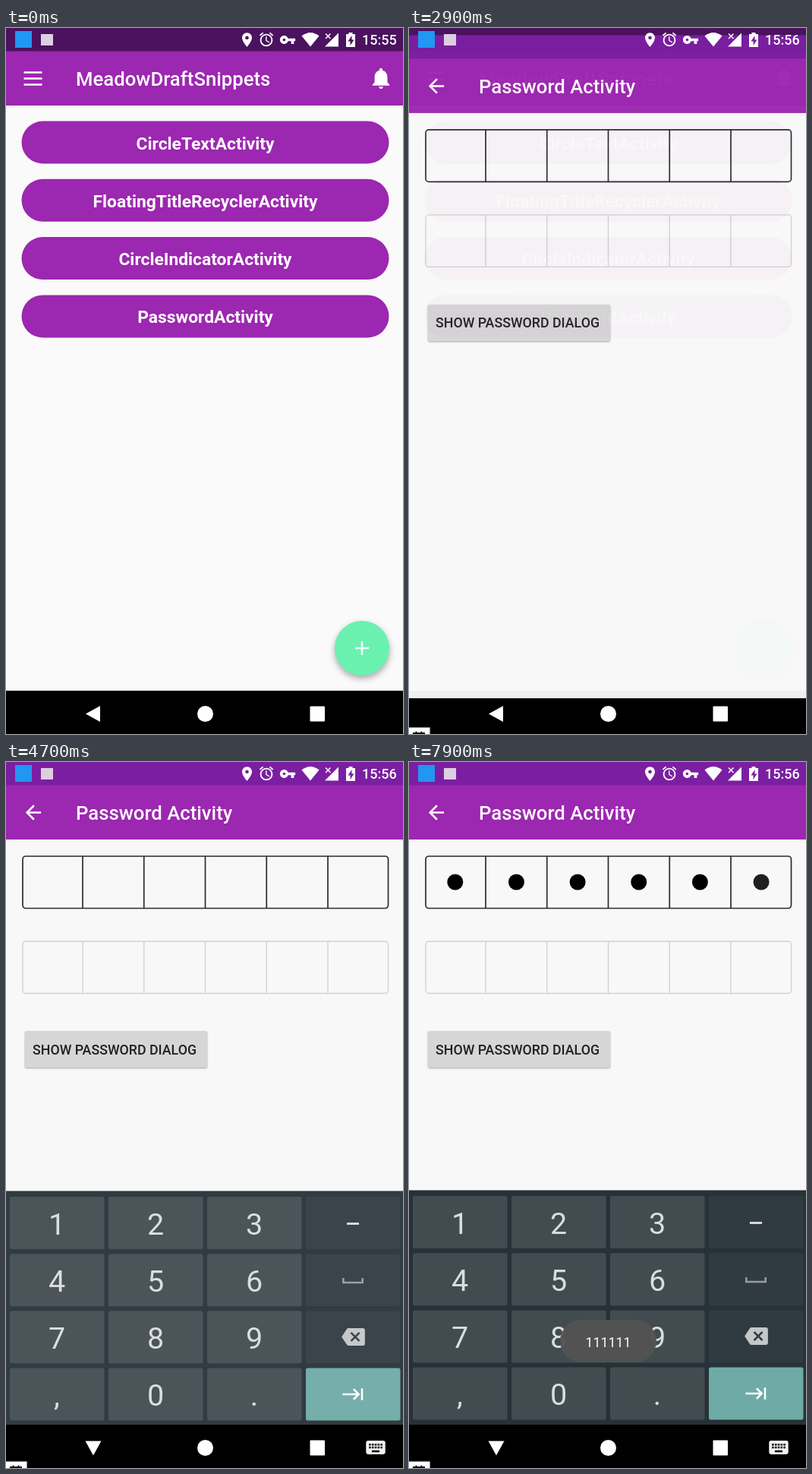
Animation, 523 px wide and 929 px high, one loop 8000 ms. Source, as an HTML page:

```html
<!DOCTYPE html>
<html lang="en">
<head>
<meta charset="utf-8">
<title>Password screen</title>
<style>
  html, body { margin: 0; width: 100%; height: 100%; overflow: hidden; background: #000; }
  svg { display: block; width: 100%; height: 100%; }
  text { font-family: Roboto, "Noto Sans", sans-serif; }
  .title { font-size: 25.7px; font-weight: 500; fill: #fff; }
  .item { font-size: 22.8px; font-weight: 700; fill: #fff; text-anchor: middle; }
  .digit { font-size: 39.5px; fill: #dadddf; text-anchor: middle; }
</style>
</head>
<body>
<svg id="stage" viewBox="0 0 523 929"></svg>
<script>
const stage = document.getElementById('stage');

// Markup helpers
const rect = (x, y, w, h, fill, more = '') =>
  `<rect x="${x}" y="${y}" width="${w}" height="${h}" fill="${fill}" ${more}/>`;
const text = (x, y, str, more) => `<text x="${x}" y="${y}" ${more}>${str}</text>`;
const path = (d, more = 'fill="#fff"') => `<path d="${d}" ${more}/>`;
const stroke = (color, width) => `fill="none" stroke="${color}" stroke-width="${width}"`;
// Icon on a 24-unit grid, centred on x, y
const icon = (x, y, scale, d, fill = '#fff') =>
  path(d, `fill="${fill}" transform="translate(${x} ${y}) scale(${scale}) translate(-12 -12)"`);
const range = (n, fn) => Array.from({ length: n }, (_, i) => fn(i)).join('');

const PIN = 'M12 2C8.13 2 5 5.13 5 9c0 5.25 7 13 7 13s7-7.75 7-13c0-3.87-3.13-7-7-7zm0 9.5c-1.38 0-2.5-1.12-2.5-2.5s1.12-2.5 2.5-2.5 2.5 1.12 2.5 2.5-1.12 2.5-2.5 2.5z';
const ALARM = 'M22 5.72l-4.6-3.86-1.29 1.53 4.6 3.86zM7.88 3.39L6.6 1.86 2 5.71l1.29 1.53zM12.5 8H11v6l4.75 2.85.75-1.23-4-2.37zM12 4c-4.97 0-9 4.03-9 9s4.02 9 9 9 9-4.03 9-9-4.03-9-9-9zm0 16c-3.87 0-7-3.13-7-7s3.13-7 7-7 7 3.13 7 7-3.13 7-7 7z';
const KEY = 'M12.65 10C11.83 7.67 9.61 6 7 6c-3.31 0-6 2.69-6 6s2.69 6 6 6c2.61 0 4.83-1.67 5.65-4H17v4h4v-4h2v-4zM7 14c-1.1 0-2-.9-2-2s.9-2 2-2 2 .9 2 2-.9 2-2 2z';
const BELL = 'M12 22c1.1 0 2-.9 2-2h-4c0 1.1.89 2 2 2zm6-6v-5c0-3.07-1.64-5.64-4.5-6.32V4c0-.83-.67-1.5-1.5-1.5s-1.5.67-1.5 1.5v.68C7.63 5.36 6 7.92 6 11v5l-2 2v1h16v-1z';
const ARROW = 'M20 11H7.83l5.59-5.59L12 4l-8 8 8 8 1.41-1.41L7.83 13H20z';
const ERASE = 'M22 3H7c-.69 0-1.23.35-1.59.88L0 12l5.41 8.11c.36.53.9.89 1.59.89h15c1.1 0 2-.9 2-2V5c0-1.1-.9-2-2-2zm-3 12.59L17.59 17 14 13.41 10.41 17 9 15.59 12.59 12 9 8.41 10.41 7 14 10.59 17.59 7 19 8.41 15.41 12z';
const TAB = 'M11.59 7.41L15.17 11H1v2h14.17l-3.59 3.59L13 18l6-6-6-6zM20 6v12h2V6z';
const KEYBOARD = 'M20 5H4c-1.1 0-2 .9-2 2v10c0 1.1.9 2 2 2h16c1.1 0 2-.9 2-2V7c0-1.1-.9-2-2-2zm-9 3h2v2h-2zm0 3h2v2h-2zM8 8h2v2H8zm0 3h2v2H8zm-1 2H5v-2h2zm0-3H5V8h2zm9 7H8v-2h8zm0-4h-2v-2h2zm0-3h-2V8h2zm3 3h-2v-2h2zm0-3h-2V8h2z';

function homeScreen() {
  const names = ['CircleTextActivity', 'FloatingTitleRecyclerActivity',
    'CircleIndicatorActivity', 'PasswordActivity'];
  const top = i => 122.5 + 76.3 * i;
  const pill = (i, fill, more) => rect(20.5, top(i), 484, 56, fill, 'rx="28" ' + (more || ''));
  return rect(0, 0, 523, 929, '#fafafa') + rect(0, 0, 523, 31, '#4a125f') +
    rect(0, 30.5, 523, 71.5, '#9c27b0') + rect(0, 872, 523, 57, '#000') +
    path('M23.5 58.5h24m-24 8h24m-24 8h24', stroke('#fff', 2.5)) +
    text(92, 76, 'MeadowDraftSnippets', 'class="title"') +
    icon(494, 66, 1.4, BELL) +
    range(4, i => pill(i, '#9c27b0')) +
    `<clipPath id="pill">${pill(3, '#000')}</clipPath>
     <g clip-path="url(#pill)">${pill(3, '#fff', 'id="press"')}
       <circle id="ripple" cx="294" cy="392" fill="#fff" opacity=".11"/></g>` +
    range(4, i => text(262.5, top(i) + 37, names[i], 'class="item"')) +
    `<circle cx="469" cy="816" r="36" fill="#6af1b0" style="filter:drop-shadow(0 4px 4px #0005)"/>` +
    path('M460 816h18m-9-9v18', stroke('#f5fffa', 2.6));
}

function passwordScreen() {
  const cells = (y, color, width) =>
    rect(22, y, 481.5, 68.5, 'none', `rx="4" stroke="${color}" stroke-width="${width}"`) +
    path(range(5, i => `M${101 + 80.75 * i} ${y}v68.5`), stroke(color, width));
  return rect(0, 0, 523, 929, '#f8f8f8') + rect(0, 0, 523, 31, '#7b1fa2') +
    rect(0, 30.5, 523, 71.5, '#9c27b0') + rect(0, 872, 523, 57, '#000') +
    icon(36, 66.5, 1.27, ARROW) +
    text(92, 76, 'Password Activity', 'class="title"') +
    cells(124, '#2b2b33', 1.7) + cells(236, '#d2d2d2', 1.4) +
    range(6, i => `<circle class="dot" cx="${60.8 + 80.65 * i}" cy="158" r="10.5"/>`) +
    rect(25, 354, 240, 48, '#d6d6d6', 'rx="2.5" style="filter:drop-shadow(0 1px 1px #0005)"') +
    text(35, 384.5, 'SHOW PASSWORD DIALOG', 'font-size="17.8" font-weight="500" fill="#212121"');
}

function keyboard() {
  const labels = ['123', '456', '789', ',0.'];
  const key = (row, col) => {
    const x = 5 + 130 * col, y = 571 + 75.2 * row;
    const fill = col < 3 ? '#424c50' : row < 3 ? '#303b41' : '#6faba6';
    return rect(x, y, 124.5, 69, fill, 'rx="2.5"') +
      (col < 3 ? text(x + 62, y + 49.7, labels[row][col], 'class="digit"') : '');
  };
  return rect(0, 563.5, 523, 340, '#263238') +
    range(4, row => range(4, col => key(row, col))) +
    path('M449 606.5h16', stroke('#d5d8d9', 3)) +
    path('M444.3 678v6h25.4v-6', stroke('#979d9f', 2.6)) +
    icon(457.5, 755.5, 1.28, ERASE, '#c3c7c8') + icon(457.5, 831, 1.28, TAB);
}

function systemBars() {
  return rect(12, 4, 22, 22, '#2196f3') + rect(46, 8, 16, 15, '#dccfe0') +
    icon(317.5, 15.5, .93, PIN) + icon(343, 15, .92, ALARM) + icon(371, 15.5, .92, KEY) +
    path('M389.5 10.5Q401 1.5 412.5 10.5L401 24.5z') +
    path('M438 6.5v18h-18z') + path('M421 7.5l6.5 6.5m0-6.5l-6.5 6.5', stroke('#fff', 1.5)) +
    path('M448 8h3.5v-2h5v2h3.500v17h-12zM455.500 10l-5 7.500h3v5.500l5-7.500h-3z',
      'fill="#fff" fill-rule="evenodd"') +
    text(469, 22.3, '', 'id="clock" font-size="18" font-weight="500" fill="#fff"') +
    path('M105 902.5L124 892v21z', 'id="back" fill="#fff"') +
    '<circle cx="262.5" cy="902.5" r="10.5" fill="#fff"/>' +
    rect(400.5, 892.5, 19.5, 20, '#fff', 'rx="1"') +
    `<g id="switcher">${icon(487, 902, 1.27, KEYBOARD, '#f2f2f2')}</g>`;
}

stage.innerHTML = homeScreen() +
  `<g id="next">${passwordScreen()}</g>
   <clipPath id="above">${rect(0, 0, 523, 872, '#000')}</clipPath>
   <g clip-path="url(#above)"><g id="keys">${keyboard()}</g></g>
   <g id="toast">${rect(199, 734, 127, 56, '#535353', 'rx="28"')}
     ${text(262.5, 769.5, '111111', 'font-size="17.8" fill="#fff" text-anchor="middle"')}</g>` +
  systemBars() +
  `<g id="corner">${rect(0, 919, 29, 10, '#111')}${rect(0, 920.5, 27.5, 9, '#fff')}
     ${path('M5 928h16M9.500 925.500v4m7-4v4', stroke('#111', 1.8))}</g>`;

const part = id => document.getElementById(id);
const [press, ripple, next, keys, toast, clock, back, switcher, corner] =
  ['press', 'ripple', 'next', 'keys', 'toast', 'clock', 'back', 'switcher', 'corner'].map(part);
const dots = stage.querySelectorAll('.dot');

const ramp = (t, start, length) => Math.min(1, Math.max(0, (t - start) / length));
const left = (t, start, length, power) => (1 - ramp(t, start, length)) ** power;
const fade = (el, value) => el.setAttribute('opacity', value);
const move = (el, value) => el.setAttribute('transform', value);

function draw(t) {
  clock.textContent = t < 800 ? '15:55' : '15:56';

  fade(press, .22 * ramp(t, 2650, 150));
  ripple.setAttribute('r', Math.max(0, (t - 2680) * .74));
  fade(next, 1 - left(t, 2784, 200, 4));
  move(next, `translate(0 ${74.3 * left(t, 2784, 350, 5)})`);

  fade(keys, 1 - left(t, 4575, 200, 3));
  move(keys, `translate(0 ${31 * left(t, 4575, 250, 5)})`);
  move(back, `rotate(${-90 * ramp(t, 4500, 200)} 115 902.5)`);
  fade(switcher, ramp(t, 4550, 100));

  dots.forEach((dot, i) => fade(dot, ramp(t, 5850 + 340 * i, 400)));
  fade(toast, .96 * ramp(t, 7600, 250));

  const hidden = ramp(t, 5500, 400) - ramp(t, 5967, 333);
  fade(corner, ramp(t, 2167, 333) - hidden);
}

function tick() {
  draw(Math.floor(performance.now() % 8000 / 100) * 100);
  requestAnimationFrame(tick);
}
tick();
</script>
</body>
</html>
```
